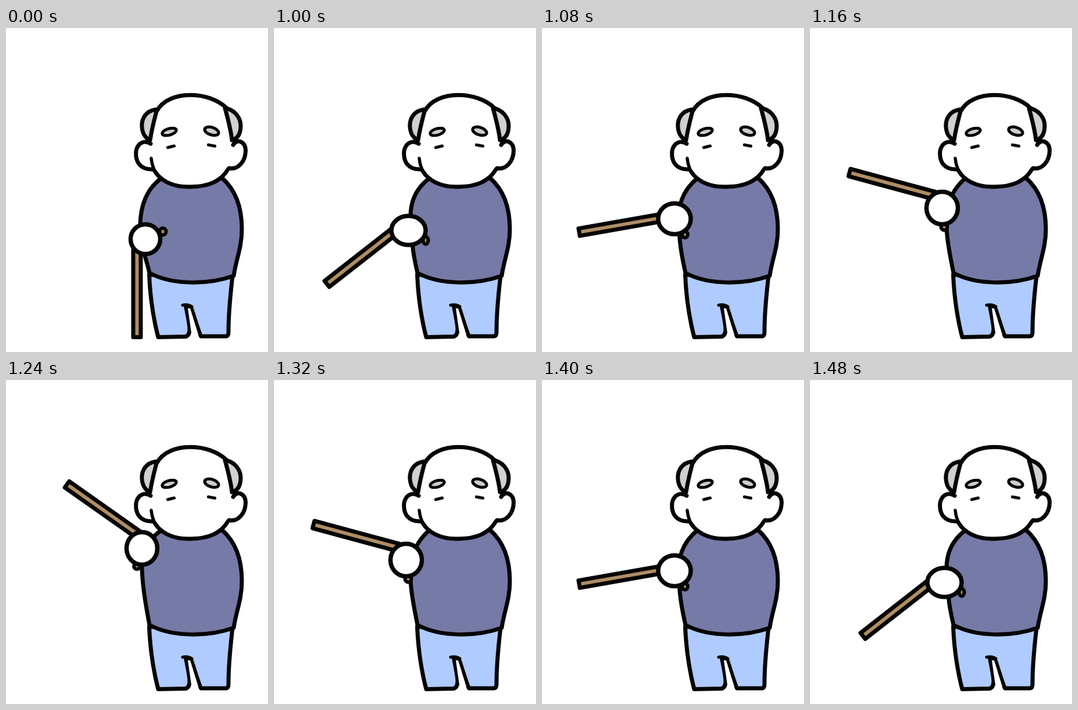
Write an HTML page that moves like this. It is 451 px wide and 557 px high and loops after 1.56 s.

```html
<!DOCTYPE html>
<html lang="en">
<head>
<meta charset="utf-8">
<title>Old man raising his cane</title>
<style>
html, body { margin: 0; width: 100%; height: 100%; overflow: hidden; background: #fff; }
svg { display: block; width: 100%; height: 100%; }
</style>
</head>
<body>
<svg viewBox="0 0 451 557" fill="none" stroke="#050505" stroke-width="7" stroke-linecap="round" stroke-linejoin="round">
  <g id="legs">
    <path fill="#b0cbff" d="M246.500 424 C248 460 253 497 262 531.500 L309 530.500 Q316 529 316 517 C315 503 312 492 309.500 478 L318 479 C324 495 328 512 335.500 530 L378 530 Q383 530 383 522 C383 490 386 460 390 426 Z"/>
    <path fill="#fff" stroke="none" d="M313 482 L317 482 L331 527 L319.500 527 Z"/>
    <path stroke-width="5" d="M304 476.500 Q313 474 320 479"/>
  </g>
  <path id="shirt" fill="#767aa6"/>
  <g id="head">
    <path fill="#fff" stroke="none" d="M250 200 C239 193 227 198 224 212 C222 230 231 243 251 243 L260 225 Z"/>
    <path fill="#fff" stroke="none" d="M388 200 C399 189 411 196 412 210 C412 230 399 244 383 241 Z"/>
    <path fill="#fff" stroke="none" d="M260 142 C280 106 350 108 380 138 C391 175 396 215 382 243 C370 263 350 273 318 274 C276 274 252 252 249 225 C247 196 250 172 260 142 Z"/>
    <path fill="#d0d0d0" d="M260 140 C241 141 233 156 234 170 C235 183 240 189 248 193 C251 174 255 158 260 140 Z"/>
    <path fill="#d0d0d0" d="M377 138 C394 140 404 155 404 168 C404 181 399 190 389 193 C387 174 382 156 377 138 Z"/>
    <path d="M260 142 C280 106 350 108 380 138 M249 199 C239 192 227 197 224 211 C222 230 231 243 251 243 M391 201 C399 189 412 196 412.500 210 C412.500 230 399 244 384 241 M382 243 C370 263 350 272.500 318 273 C286 274 266 262 256 246"/>
    <path stroke-width="5.500" d="M250 224 C251 235 254 243 259 250"/>
    <g fill="#ccc" stroke-width="5">
      <ellipse cx="281" cy="178.500" rx="12.500" ry="5.500" transform="rotate(-16 281 178.500)"/>
      <ellipse cx="354" cy="177.300" rx="12.500" ry="6.500" transform="rotate(18 354 177.300)"/>
    </g>
    <path stroke-width="5.200" d="M278.500 205.500 L289.500 202.800 M348.500 201 L359.500 203"/>
  </g>
  <g fill="#b08d64">
    <ellipse id="knob" stroke-width="6"/>
    <rect id="cane" y="-6.500" height="13"/>
  </g>
  <ellipse id="hand" fill="#fff" stroke-width="7.500"/>
</svg>
<script>
const el = id => document.getElementById(id);
const set = (node, attrs) => Object.entries(attrs).forEach(([k, v]) => node.setAttribute(k, v));

// side: left shirt edge; tip and grip: cane ends; knob: x, y, rx, ry, turn; hand: x, y, rx, ry
const poses = {
  rest: { side: 'C241 395 230 370 231 340 C231 305 243 275 268 258',
    tip: [225.5, 531.5], grip: [225.5, 370], knob: [270, 350, 5.5, 6, 0], hand: [240, 363, 25.5, 25.5] },
  low: { side: 'C241 395 237 375 237 345 C230 305 242 277 268 258',
    tip: [91, 440], grip: [214, 344], knob: [261, 365, 4.5, 6.5, 0], hand: [231.5, 348, 29.5, 25] },
  level: { side: 'C241 395 236 370 236 342 C232 307 243 278 268 258',
    tip: [64, 351], grip: [215, 324.5], knob: [246, 355, 5, 5.5, 0], hand: [228, 328, 28, 26.5] },
  high: { side: 'C242 395 235 365 235 340 C233 310 242 279 268 258',
    tip: [68, 248.5], grip: [220, 289.5], knob: [231, 341.5, 5.5, 6, 0], hand: [227.5, 309.5, 27, 28] },
  top: { side: 'C240 385 234 345 234 320 C235 296 245 273 268 258',
    tip: [105, 179.5], grip: [230, 267.5], knob: [226, 320, 6, 5, -15], hand: [234, 289.5, 26.5, 28] }
};
const swing = ['low', 'level', 'high', 'top', 'high', 'level', 'low'];
const REST = 1000, STEP = 80, LOOP = REST + STEP * swing.length;

function draw(time) {
  const t = time % LOOP;
  const { side, tip, grip, knob, hand } = poses[t < REST ? 'rest' : swing[Math.floor((t - REST) / STEP)]];
  const [dx, dy] = [grip[0] - tip[0], grip[1] - tip[1]];
  const turn = Math.atan2(dy, dx) * 180 / Math.PI;
  const [x, y, rx, ry, tilt] = knob;

  set(el('shirt'), { d: `M247 421 ${side} L372 258 C395 278 406 306 406 346 C406 377 396 398 392 426 C348 442 285 442 247 421 Z` });
  set(el('cane'), { width: Math.hypot(dx, dy), transform: `translate(${tip}) rotate(${turn})` });
  set(el('knob'), { cx: x, cy: y, rx, ry, transform: `rotate(${tilt} ${x} ${y})` });
  set(el('hand'), { cx: hand[0], cy: hand[1], rx: hand[2], ry: hand[3] });
}

const start = performance.now();
function tick() {
  draw(performance.now() - start);
  requestAnimationFrame(tick);
}
tick();
</script>
</body>
</html>
```
